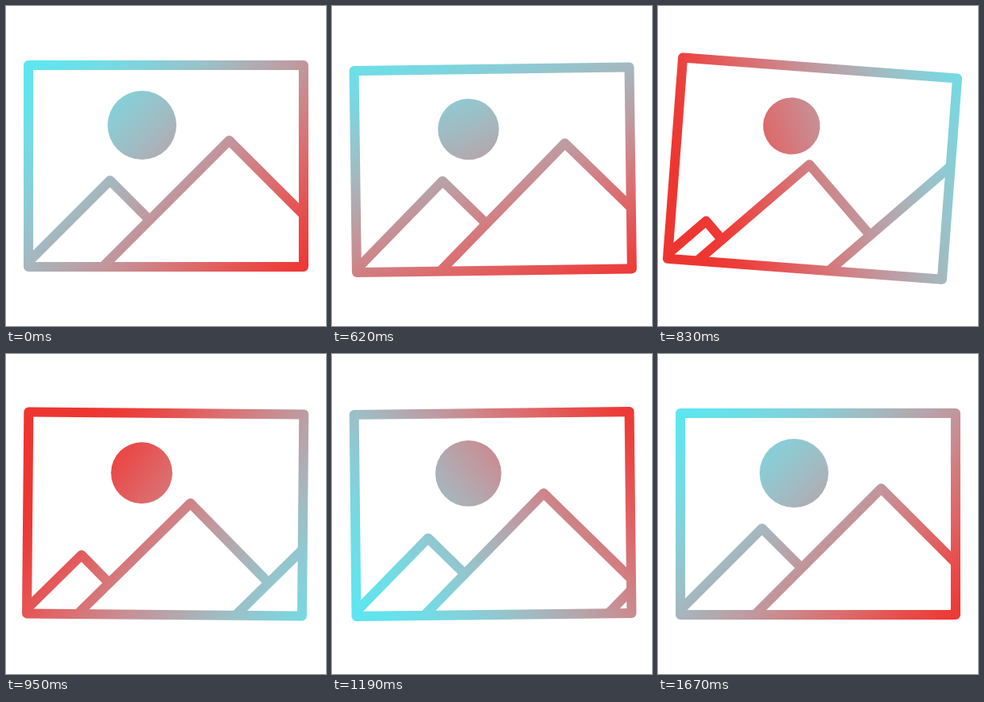
Recreate the animation shown at these times as an HTML page with a canvas. Size 400 by 400 pixels, loop 1.7 s.

```html
<!DOCTYPE html>
<html lang="en">
<head>
<meta charset="utf-8">
<title>Picture icon</title>
<style>
  html, body { margin: 0; width: 100%; height: 100%; overflow: hidden; background: #fff; }
  canvas { display: block; width: 100vmin; height: 100vmin; }
</style>
</head>
<body>
<canvas id="stage" width="400" height="400"></canvas>
<script>
const ctx = document.getElementById('stage').getContext('2d');

const LOOP = 1700, HOLD = 500, STEP = 30, STEPS = 40;
const FRAME = { x: 28, y: 74, w: 344, h: 252 };
const GROUND = FRAME.y + FRAME.h;
const PIVOT = { x: 200, y: 108 };
const CYAN = [92, 230, 240], RED = [238, 54, 49];
const GRADIENT_LENGTH = 470;

// Keyframes as [step, value]
const TILT = [[0, 0], [3, -2.1], [10, 5], [20, -1.84], [29, 1.05], [40, 0]];
const DROP = [[0, 0], [8, 6.8], [16, 0], [40, 0]];
const SUN_RADIUS = [[0, 43], [9, 34.8], [22, 41.2], [40, 43]];
const GRADIENT_LAG = [[0, 0], [16, 85], [24, 0], [40, 0]];

// Each mountain takes the place of the next one; slide and rise are easings of x and height
const MOUNTAINS = [
  { x: [22, 130], h: [0, 108], slide: [0.36, 0.14], rise: [0.36, 0.14] },
  { x: [130, 279], h: [108, 158], slide: [0.4, 0.12], rise: [0.25, 0.28] },
  { x: [279, 526], h: [158, 158], slide: [0.4, 0.12], rise: [0.4, 0.12] },
];

const mix = (a, b, u) => a + (b - a) * u;
const sineEase = u => (1 - Math.cos(Math.PI * u)) / 2;
const smooth = u => u * u * (3 - 2 * u);

// Cubic Bezier easing with control points (x1, 0) and (x2, 1)
function bezierEase([x1, x2], x) {
  let low = 0, high = 1;
  for (let i = 0; i < 24; i++) {
    const s = (low + high) / 2, r = 1 - s;
    if (3 * r * r * s * x1 + 3 * r * s * s * x2 + s * s * s < x) low = s;
    else high = s;
  }
  return smooth(low);
}

function track(keys, step) {
  const i = Math.max(1, keys.findIndex(key => key[0] >= step));
  const [from, a] = keys[i - 1], [to, b] = keys[i];
  return mix(a, b, sineEase((step - from) / (to - from)));
}

// Cyan to red, blended by light intensity so the middle stays bright
function makeGradient(angle, lag) {
  const c = Math.cos(angle), s = Math.sin(angle), half = GRADIENT_LENGTH / 2;
  const x = 200 - c * lag, y = 200 - s * lag;
  const gradient = ctx.createLinearGradient(x - c * half, y - s * half, x + c * half, y + s * half);
  for (let i = 0; i <= 16; i++) {
    const u = smooth(i / 16);
    const rgb = CYAN.map((v, k) => Math.round(Math.sqrt(mix(v * v, RED[k] * RED[k], u))));
    gradient.addColorStop(i / 16, `rgb(${rgb})`);
  }
  return gradient;
}

function drawMountain(x, h) {
  ctx.beginPath();
  ctx.moveTo(x - h - 20, GROUND + 20);
  ctx.lineTo(x, GROUND - h);
  ctx.lineTo(x + h + 20, GROUND + 20);
  ctx.fillStyle = '#fff';
  ctx.fill();
  ctx.stroke();
}

function draw(step) {
  const u = step / STEPS;
  const turn = bezierEase([0.27, 0.5], u);

  ctx.fillStyle = '#fff';
  ctx.fillRect(0, 0, 400, 400);
  ctx.save();
  ctx.translate(PIVOT.x, PIVOT.y + track(DROP, step));
  ctx.rotate(track(TILT, step) * Math.PI / 180);
  ctx.translate(-PIVOT.x, -PIVOT.y);
  const paint = makeGradient(Math.PI / 4 + turn * 2 * Math.PI, track(GRADIENT_LAG, step));
  ctx.strokeStyle = paint;
  ctx.lineWidth = 12;
  ctx.lineJoin = 'round';

  ctx.fillStyle = paint;
  ctx.beginPath();
  ctx.arc(170, 149, track(SUN_RADIUS, step), 0, 2 * Math.PI);
  ctx.fill();

  ctx.save();
  ctx.beginPath();
  ctx.rect(FRAME.x, FRAME.y, FRAME.w, FRAME.h);
  ctx.clip();
  for (const { x, h, slide, rise } of MOUNTAINS) {
    drawMountain(mix(...x, bezierEase(slide, u)), mix(...h, bezierEase(rise, u)));
  }
  ctx.restore();

  ctx.strokeRect(FRAME.x, FRAME.y, FRAME.w, FRAME.h);
  ctx.restore();
}

const start = performance.now();

function tick() {
  const time = (performance.now() - start) % LOOP;
  draw(time < HOLD ? 0 : Math.min(STEPS, Math.floor((time - HOLD) / STEP) + 1));
  requestAnimationFrame(tick);
}
tick();
</script>
</body>
</html>
```
